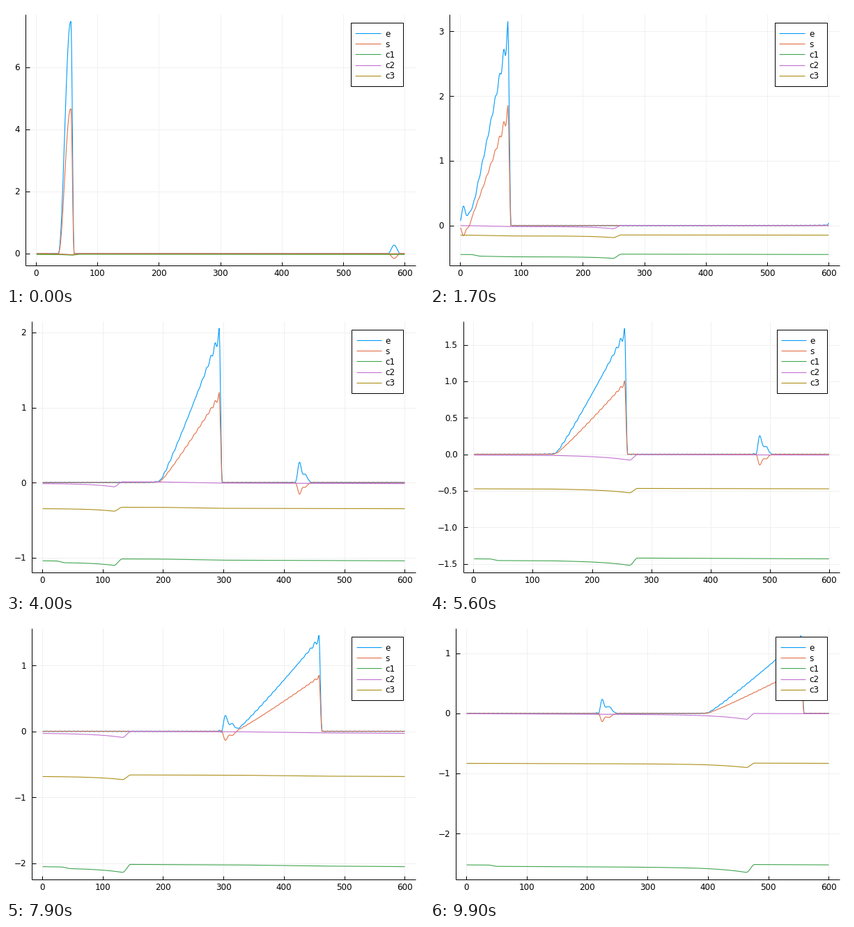
These frames come from a looping animation (600x400 px, 10000 ms). A matplotlib script:

```python
import numpy as np
import matplotlib.pyplot as plt
from matplotlib.animation import FuncAnimation
from matplotlib.patches import Rectangle

plt.rcParams["font.family"] = "DejaVu Sans"

N = 600                       # points on the periodic domain
FRAMES = 100
TOP, BOTTOM, RIGHT = 12, 372, 588
PX = 0.72                     # points per pixel at 100 dpi
FONT = 12 * PX
COLORS = ["#009afa", "#e36f47", "#3ea44e", "#c371d2", "#ac8e18"]
NAMES = ["e", "s", "c1", "c2", "c3"]
X = np.arange(1, N + 1, dtype=float)

# Slowly drifting quantities, linear between these moments
KEYS = [0, 17, 28, 40, 56, 79, 99]
WIDTH_SQ = [552, 4489, 7276, 10140, 14209, 19853, 24806]
BASE_C1 = [-.025, -.441, -.718, -1.019, -1.421, -2.018, -2.517]
BASE_C2 = [0, .003, .008, .009, -.003, 0, 0]
BASE_C3 = [-.008, -.145, -.232, -.33, -.467, -.661, -.828]


def smooth(t):
    t = np.clip(t, 0, 1)
    return t * t * (3 - 2 * t)


def bump(y, centre, width):
    return np.exp(-((y - centre) / width) ** 2)


def shock(n, tail, width):
    """Right-running sawtooth with a rippled crest."""
    young = np.exp(-n / 3)
    peak = (205.5 + 12 * np.exp(-n / 25)) / width * (1 - .193 * young)
    v = (X - tail + 150) % N - 150
    ramp = .98 * ((v + np.sqrt(v * v + 16)) / 2 / width) ** 1.08
    back = width - 3 - v
    near = (.03 + .07 * np.exp(-n / 20)) * np.exp(-np.abs(back) / 10)
    far = .008 * np.exp(-n / 60) * smooth(v / 12)
    ramp += (near + far) * smooth(v / 10) * np.cos(2 * np.pi * back / 7)
    hump = np.sin(np.pi / 2 * np.clip(v / 20, 0, 1)) ** 2
    shape = (1 - young) * ramp + young * hump
    return peak * shape * (1 - smooth((v - width + 3) / 5))


def pulse(n):
    """Left-running small pulse that grows a shoulder behind it."""
    young = np.exp(-n / 3)
    age = n / 99
    y = (X + 18.5 + 33.91 * n - 1.5 * young + 300) % N - 300
    length = 16 + 10 * age
    old = (.235 - .07 * age) * bump(y, 0, 3.6)
    old += .115 * smooth((y + 4) / 8) * (1 - smooth((y - 8) / (length - 8)))
    old += age * (.02 * bump(y, 13, 3) - .02 * bump(y, 7, 2.5)
                  - .035 * bump(y, -5.5, 1.6) + .015 * bump(y, -9, 1.6))
    first = .27 * np.cos(np.pi / 2 * np.clip(y / 10, -1, 1)) ** 2
    return (1 - young) * old + young * first


def slow_field(n, tail, width, depth, slope, drop, step):
    """Sag that builds up behind the fast kink, measured from its front."""
    kink = 58 + 46.52 * n
    q = (X - kink) % N
    x = np.where(q < 14, kink - .01, X)

    def fall(start, span):
        v = (x - start) % N
        return np.clip(v / span, 0, 1) * (v < (kink - start) % N)

    d = (kink - x) % N
    sag = drop * fall(tail, width) + slope * (1 - d / N)
    sag = sag + step * min(1, n / 10) * smooth(fall(14 + .22 * n, 16))
    sag = sag + (depth - drop - slope - step) * np.exp(-d / (25 + .25 * n))
    return -sag * np.where(q < 14, 1 - smooth(q / 14), 1)


def fields(n):
    tail = 36.5 + 33.97 * n
    width = np.sqrt(np.interp(n, KEYS, WIDTH_SQ))
    young = np.exp(-n / 3)
    main, small = shock(n, tail, width), pulse(n)
    ripple = .005 * (1 - young) * np.cos(2 * np.pi * X / 7.5)
    e = main + small + ripple
    s = (.587 + .037 * young) * main - .575 * small - .6 * ripple
    slope = .003 + .0002 * n
    c1 = np.interp(n, KEYS, BASE_C1) + slow_field(
        n, tail, width, .05 + .0009 * n, .005 + .00025 * n, .012, .022)
    c2 = np.interp(n, KEYS, BASE_C2) + slow_field(
        n, tail, width, .04 + .00067 * n, slope, .014, 0)
    c3 = np.interp(n, KEYS, BASE_C3) + slow_field(
        n, tail, width, .034 + .00047 * n, .7 * slope, .012, 0)
    return [e, s, c1, c2, c3]


def pick_ticks(lo, hi):
    """Tick values with the best mix of count, roundness and coverage."""
    best, ticks, step = -1, [], 1
    for size, nice in ((1, 1), (.5, .9), (2, .7)):
        marks = np.arange(np.ceil(lo / size), np.floor(hi / size) + 1) * size
        k = len(marks)
        if not 4 <= k <= 9:
            continue
        score = (.25 * (1 - abs(k - 5) / 5) + .25 * nice
                 + .5 * (hi - lo) / ((k - 1) * size))
        if score > best:
            best, ticks, step = score, marks, size
    labels = [(f"{t + 0:.1f}" if step < 1 else f"{t + 0:.0f}") for t in ticks]
    return ticks, [t.replace("-0.0", "0.0").replace("-", "\u2212")
                   if float(t) else t.lstrip("-") for t in labels]


def text_width(label, em=11):
    return em * sum({"\u2212": .838, ".": .318}.get(c, .636) for c in label)


fig = plt.figure(figsize=(6, 4), dpi=100, facecolor="white")
ax = fig.add_axes([0, 0, 1, 1])


def line(xs, ys, color="black", width=1.0, z=2):
    ax.plot(xs, ys, color=color, lw=width * PX, zorder=z,
            solid_capstyle="butt")


def label(x, y, text, align, z=4):
    ax.text(x, y, text, ha=align, va="baseline", fontsize=FONT, zorder=z)


def draw_legend(extra):
    left, right = 494.8 + .17 * extra, 569.6 + .03 * extra
    ax.add_patch(Rectangle((left, 24), right - left, 90.5, fc="white",
                           ec="black", lw=PX, zorder=5))
    for i, (name, color) in enumerate(zip(NAMES, COLORS)):
        y = 39.2 + 15.1 * i
        line([501 + .17 * extra, 538 + .075 * extra], [y, y], color, 1.1, 6)
        label(544 + .07 * extra, y + 4.5, name, "left", 6)


def draw(n):
    ax.clear()
    ax.set(xlim=(0, 600), ylim=(400, 0))
    ax.axis("off")

    series = fields(n)
    lo = min(f.min() for f in series)
    hi = max(f.max() for f in series)
    pad = .03 * (hi - lo)
    lo, hi = lo - pad, hi + pad
    ticks, labels = pick_ticks(lo, hi)
    left = round(21 + max(map(text_width, labels)))
    margin = .03 * (N - 1)

    def px(x):
        return left + (x - 1 + margin) / (N - 1 + 2 * margin) * (RIGHT - left)

    def py(y):
        return BOTTOM - (y - lo) / (hi - lo) * (BOTTOM - TOP)

    for t in range(0, N + 1, 100):
        x = px(t)
        line([x, x], [TOP, BOTTOM], "#f0f0f0", 1, 1)
        line([x, x], [BOTTOM, BOTTOM - 5.5])
        label(x, 387, str(t), "center")
    for t, text in zip(ticks, labels):
        y = py(t)
        line([left, RIGHT], [y, y], "#f0f0f0", 1, 1)
        line([left, left + 6], [y, y])
        label(left - 8, y + 4.5, text, "right")
    line([left, left], [TOP, BOTTOM])
    line([left, RIGHT], [BOTTOM, BOTTOM])

    for f, color in zip(series, COLORS):
        line(px(X), py(f), color, 1.1, 3)
    draw_legend(RIGHT - 560 + left - 56)
    return []


anim = FuncAnimation(fig, draw, frames=FRAMES, init_func=lambda: [],
                     interval=100, repeat=True, repeat_delay=0, blit=False)
plt.show()
```
